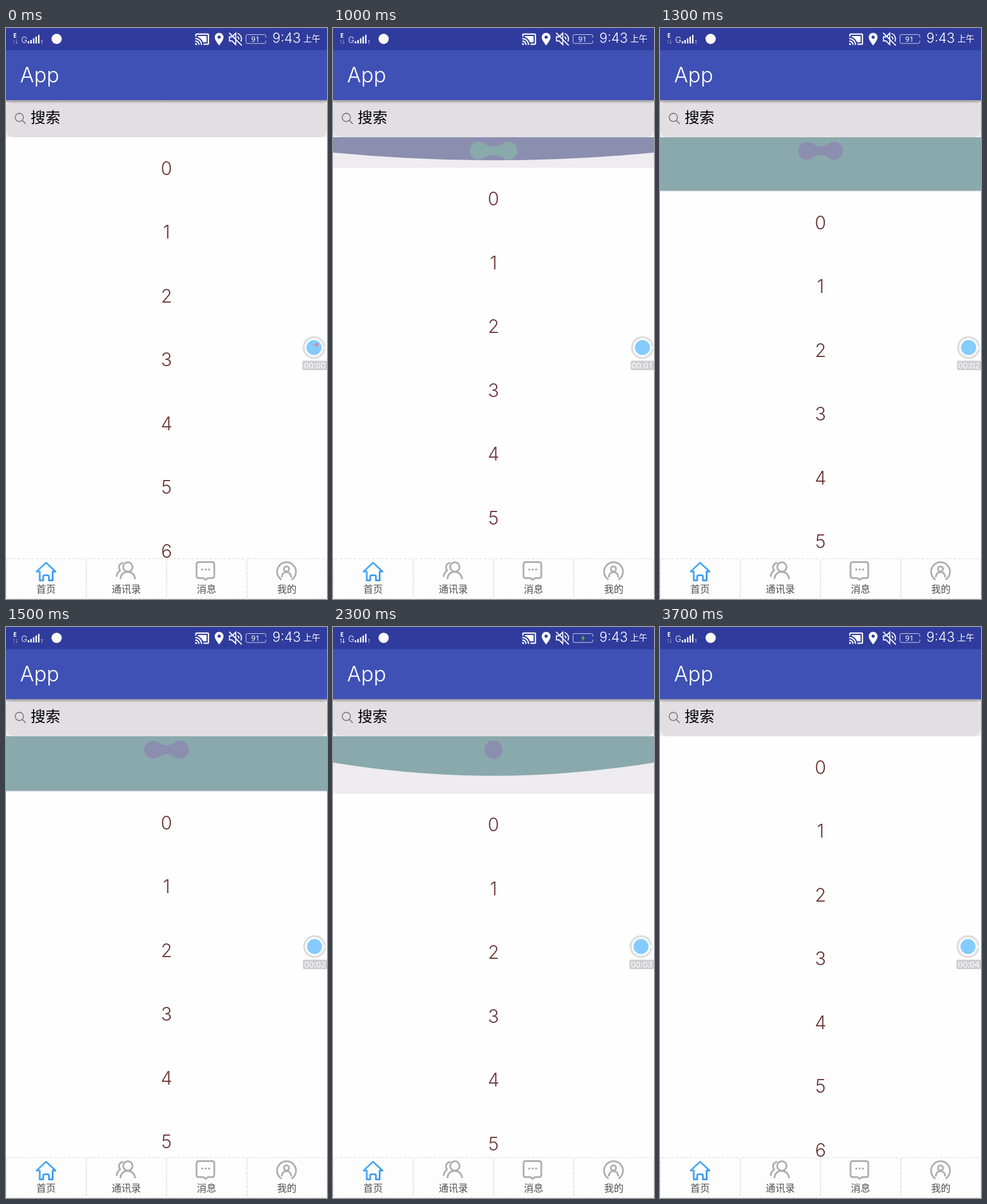
Recreate the animation shown at these times as an HTML page. Size 561 by 998 pixels, loop 4 s.

```html
<!DOCTYPE html>
<html lang="zh">
<head>
<meta charset="utf-8">
<title>App</title>
<style>
  html, body { margin: 0; width: 100%; height: 100%; overflow: hidden; background: #fefefe; }
  svg { display: block; width: 100%; height: 100%; }
  text { font-family: "Noto Sans", "Noto Sans CJK SC", sans-serif; }
  .mid { text-anchor: middle; }
  .white { fill: #fff; }
  .thin { font-family: Inter, sans-serif; font-weight: 300; }
  .digit { font-size: 32px; fill: #6b3636; }
  .tab { font-size: 17px; fill: #505050; }
  .line { fill: none; stroke: #adadad; stroke-width: 3; stroke-linecap: round; stroke-linejoin: round; }
</style>
</head>
<body>
<svg viewBox="0 0 561 998">
  <defs>
    <linearGradient id="shade" x2="0" y2="1">
      <stop offset="0" stop-color="#000" stop-opacity=".35"/>
      <stop offset="1" stop-color="#000" stop-opacity="0"/>
    </linearGradient>
    <linearGradient id="blue" x2="1" y2="1">
      <stop offset="0" stop-color="#4fb0fa"/>
      <stop offset="1" stop-color="#3a93ea"/>
    </linearGradient>
  </defs>

  <!-- pull header -->
  <rect y="126" width="561" height="801" fill="#eeecf0"/>
  <path id="band"/>
  <g id="dots">
    <circle id="left" cy="214.5" r="15.7"/>
    <circle id="right" cy="214.5" r="15.7"/>
    <path id="bridge"/>
  </g>

  <!-- list -->
  <g id="list"><rect y="191" width="561" height="807" fill="#fefefe"/></g>

  <!-- search -->
  <rect y="126" width="561" height="65" fill="#f0eef1"/>
  <rect y="127" width="561" height="64" rx="14" fill="#e1dfe2"/>
  <g fill="none" stroke="#777" stroke-width="1.6">
    <circle cx="23.3" cy="156.3" r="7.2"/>
    <path d="M28.6 161.6l6 6"/>
  </g>
  <text x="43" y="166" font-size="26" font-weight="500">搜索</text>

  <!-- app bar -->
  <rect y="126" width="561" height="6" fill="url(#shade)"/>
  <rect width="561" height="126" fill="#3f51b5"/>
  <rect width="561" height="39" fill="#303c9d"/>
  <text class="white thin" x="24.5" y="94.5" font-size="36.5">App</text>

  <!-- status bar -->
  <g class="white">
    <text x="12.8" y="17" font-size="10.5" font-weight="600">E</text>
    <path id="arrows" d="M13.8 28v-5.5h-1.8l2.5-2.5v8zM18 20v5.5h-1.5l2 2.5 2-2.5h-1.5v-5.5z"/>
    <text class="thin" x="26.5" y="26" font-size="14.5">G</text>
    <path d="M38 23h2.5v4h-2.500zM42.500 21h2.500v6h-2.500zM47 18h2.500v9h-2.500zM51.500 15h2.500v12h-2.500zM56 12h2.500v15h-2.500z"/>
    <text x="60.5" y="28" font-size="8">1</text>
    <circle cx="88.5" cy="19" r="9"/>
    <path transform="translate(329.6 6.3) scale(1.1)" d="M1 18v3h3c0-1.66-1.34-3-3-3zm0-4v2c2.76 0 5 2.24 5 5h2c0-3.87-3.13-7-7-7zm18-7H5v1.63c3.96 1.28 7.09 4.41 8.37 8.37H19V7zM1 10v2c4.97 0 9 4.03 9 9h2c0-6.08-4.93-11-11-11zm20-7H3c-1.1 0-2 .9-2 2v3h2V5h18v14h-7v2h7c1.1 0 2-.9 2-2V5c0-1.1-.9-2-2-2z"/>
    <path transform="translate(359.3 6.2) scale(1.1)" fill-rule="evenodd" d="M12 2C8.13 2 5 5.13 5 9c0 5.25 7 13 7 13s7-7.75 7-13c0-3.87-3.13-7-7-7zm0 9.5a2.5 2.5 0 0 1 0-5 2.5 2.5 0 0 1 0 5z"/>
    <text class="thin" x="465.5" y="26" font-size="23.5">9:43</text>
    <text x="519.5" y="24" font-size="15">上午</text>
  </g>
  <path fill="none" stroke="#fff" stroke-width="1.8" d="M390.500 15.500h4.500l6.500-6.500v20l-6.500-6.500h-4.500zM390 8.500l22 22M404.500 9.500a10 10 0 0 1 6 14M404.500 15a5 5 0 0 1 2.500 5"/>
  <rect x="419.5" y="11.5" width="34.5" height="15.5" rx="2.5" fill="none" stroke="#d5d8ee"/>
  <path d="M454 17v5" stroke="#303c9d" stroke-width="2"/>
  <text id="level" class="mid white" x="436" y="23.5" font-size="13">91</text>
  <path id="bolt" d="M438.5 13.5l-5 6.500h3l-1.500 5.500 5.500-7h-3.300z" fill="#5fc21a"/>

  <!-- recorder -->
  <g id="rec">
    <circle cx="20.3" cy="558.5" r="20" fill="#dedee0"/>
    <circle cx="20.3" cy="558.5" r="16.3" fill="#fff"/>
    <circle cx="20.3" cy="558.5" r="13.2" fill="#86cbfe"/>
    <path d="M38.3 556v5" stroke="#fff" stroke-width="2"/>
    <circle id="red" cx="24.5" cy="553.7" r="3" fill="#f07f86"/>
    <rect id="plate" y="581.5" height="16.5" rx="2.5" fill="#cfced0"/>
    <text id="clock" class="mid white" y="594.5" font-size="14.8" font-weight="300"></text>
  </g>

  <!-- tabs -->
  <rect y="927" width="561" height="71" fill="#fdfdfd"/>
  <g id="tabs" fill="none" stroke="#dcdcdc" stroke-dasharray="5 3"></g>
  <path class="line" style="stroke:url(#blue)" d="M70 934.5L53.5 950H59V965.5H65V959q0-2.500 2.500-2.500h5q2.500 0 2.500 2.500V965.500H81.500V950H86.500z"/>
  <g class="line">
    <circle cx="213" cy="942" r="8.2"/>
    <path d="M200 962c1-7 6-11.500 12-11.500 7 0 12 4 13.500 11.500M204 935c-6 1-8.500 8-4.500 13-3.500 2.500-5.500 6-6 10"/>
    <path d="M337 933.500h23q4 0 4 4v20q0 4-4 4h-7l-4 3-4-3h-8q-4 0-4-4v-20q0-4 4-4z"/>
    <path d="M480.500 963.500a16.500 16.500 0 1 1 19.500 0"/>
    <circle cx="490.2" cy="945.5" r="4.5"/>
    <path d="M482 959c.5-5 4-8 8.200-8s7.700 3 8.200 8"/>
  </g>
  <path d="M343 946.500h.01M349 946.500h.01M355 946.500h.01" stroke="#a5a5a5" stroke-width="3.5" stroke-linecap="round"/>
</svg>
<script>
  const LOOP = 4000, STEP = 100, TOP = 191, MID = 280.5;
  const BLUE = "#8b8eaf", TEAL = "#8aa9ac";
  const $ = id => document.getElementById(id);

  function add(parent, tag, attrs, text = "") {
    const el = document.createElementNS("http://www.w3.org/2000/svg", tag);
    set(el, attrs);
    el.textContent = text;
    parent.append(el);
  }
  function set(el, attrs) {
    for (const key in attrs) el.setAttribute(key, attrs[key]);
  }
  const show = (id, on) => set($(id), { opacity: on ? 1 : 0 });

  for (let i = 0; i < 7; i++)
    add($("list"), "text", { class: "digit thin mid", x: MID, y: 256.5 + i * 111.5 }, i);

  ["首页", "通讯录", "消息", "我的"].forEach((name, i) => {
    const x = i * 140.25;
    add($("tabs"), "rect", { x: x + .5, y: 927.5, width: 139.5, height: 70, rx: 3 });
    add($("tabs").parentNode, "text", { class: "tab mid", x: x + 70, y: 987 }, name);
  });

  // Linear interpolation through [time, value] points.
  function track(points, t) {
    const i = points.findIndex(p => p[0] > t);
    if (i < 0) return points[points.length - 1][1];
    if (!i) return points[0][1];
    const [t0, a] = points[i - 1], [t1, b] = points[i];
    return a + (b - a) * (t - t0) / (t1 - t0);
  }

  const pull = [[700, 0], [800, 12], [1000, 53.5], [1200, 84], [1300, 95],
                [1600, 98], [1700, 100.5], [3500, 100.5], [3600, 46], [3700, 0]];

  function drawHeader(t) {
    const y = track(pull, t);
    const ready = t >= 1200, flat = ready && t < 1700;
    const tip = flat ? y - 1.5 : Math.min(y, 92);
    const edge = flat ? tip : tip / 2;
    set($("list"), { transform: `translate(0 ${y})` });
    set($("band"), {
      d: `M0 ${TOP}H561V${TOP + edge}Q${MID} ${TOP + tip} 0 ${TOP + edge}z`,
      fill: ready ? TEAL : BLUE
    });

    // The dots drift together while pulling, then merge with an ease in and out.
    const p = Math.min(1, Math.max(0, (t - 1550) / 750));
    const gap = p ? 23.5 * (1 + Math.cos(Math.PI * p)) : Math.max(47, 58 - y * .115);
    const a = MID - gap / 2, b = MID + gap / 2, k = 11;
    set($("dots"), { fill: ready ? BLUE : TEAL });
    set($("left"), { cx: a });
    set($("right"), { cx: b });
    set($("bridge"), {
      d: gap < 24 ? "" : `M${a + k} 203.3Q${MID} 210.5 ${b - k} 203.3V225.7Q${MID} 218.5 ${a + k} 225.7z`
    });
  }

  function drawRecorder(t) {
    const sec = [300, 1200, 2100, 3200].filter(s => t >= s).length;
    const x = [518, 520.5, 519, 518, 518][sec], w = 561 - x;
    set($("rec"), { transform: `translate(${x} 0)` });
    set($("plate"), { width: w });
    set($("clock"), { x: w / 2 });
    $("clock").textContent = "00:0" + sec;
    show("red", t < 100 || t >= 1700 && t < 2100);
  }

  function drawStatus(t) {
    const charging = t >= 1800 && t < 2900;
    show("bolt", charging);
    show("level", !charging);
    set($("arrows"), { opacity: t >= 1700 && t < 3000 ? 1 : .4 });
  }

  function frame(now) {
    const t = Math.floor(now % LOOP / STEP) * STEP;
    drawHeader(t);
    drawRecorder(t);
    drawStatus(t);
    requestAnimationFrame(frame);
  }
  frame(performance.now());
</script>
</body>
</html>
```
